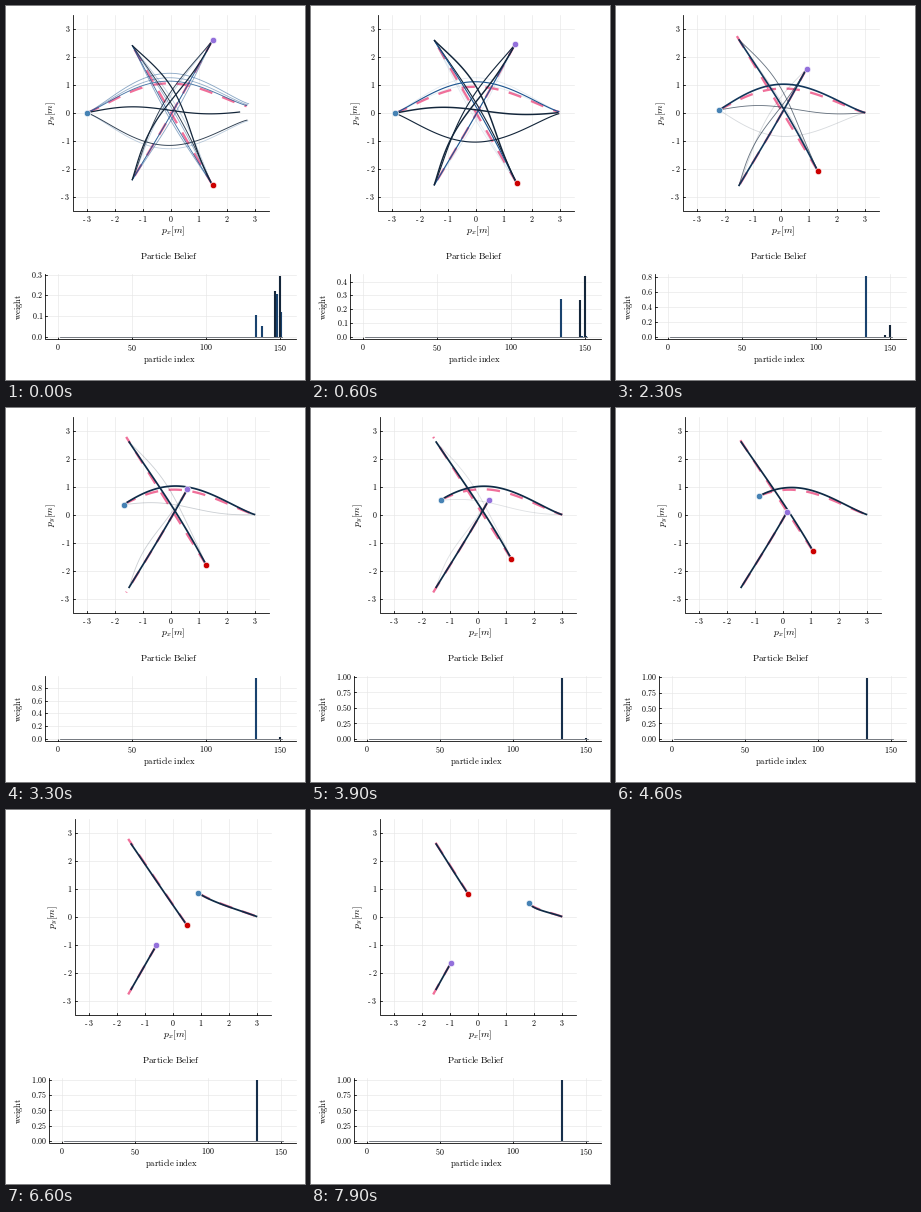
Write a matplotlib script that moves like this. It is 299x374 px and loops after 8 s.

```python
import matplotlib.pyplot as plt
import numpy as np
from matplotlib.animation import FuncAnimation
from matplotlib.colors import to_rgb

W, H, FRAMES, STEP = 299, 374, 80, 100
UNIT = 28  # pixels per metre
plt.rcParams["mathtext.fontset"] = "cm"

fig = plt.figure(figsize=((W + 1e-6) / 72, (H + 1e-6) / 72), dpi=72, facecolor="white")
ax = fig.add_axes([0, 0, 1, 1])

# Agents: blue, red, purple, with a few points (metres) passed at times T (seconds)
T = np.array([0, 1.5, 4.6, 6.6, 7.9])
TRACKS = np.array([
    [(-3, 0), (-2.54, -.02), (-.83, .66), (.91, .86), (1.83, .5)],
    [(1.5, -2.6), (1.37, -2.27), (1.09, -1.31), (.5, -.29), (-.33, .8)],
    [(1.5, 2.6), (1.15, 2), (.15, .09), (-.58, -1.02), (-.96, -1.66)],
])
GOALS = np.array([(3.02, 0), (-1.5, 2.62), (-1.5, -2.62)])
DOTS = ["#4682b4", "#cc0000", "#9370db"]
BLUE, DARK, DEEP, PINK = "#1d5590", "#14263a", "#0e2a45", "#f0709a"

# index: colour, log weight as a parabola in time, plan bend per agent, sway (pixels)
PARTICLES = {
    138: (BLUE, (-1.72, -5.4, 0), (-32, -8, -9), 0),
    151: (BLUE, (-.9, -5.4, 0), (35, 4, 4), 0),
    148: (BLUE, (-.36, -7, 0), (28, 2, 1), 0),
    147: (DARK, (-.29, -.2, -.25), (-29, -5, -11), 0),
    134: (BLUE, (-1.03, .8, .16), (31, -3, 1), 0),
    150: (DARK, (0, 0, 0), (3, -12, -7), 3.5),
}
TRUE_BEND = (26, 0, 1)
VISIBLE = .004
S = np.linspace(0, 1, 60)


def position(track, t):
    """Cubic Hermite curve through the track, starting at rest."""
    slope = np.gradient(track, T, axis=0)
    slope[0] = 0
    k = min(np.searchsorted(T, t, side="right") - 1, len(T) - 2)
    h = T[k + 1] - T[k]
    u = (t - T[k]) / h
    return ((1 + 2 * u) * (1 - u) ** 2 * track[k] + u * (1 - u) ** 2 * h * slope[k]
            + u * u * (3 - 2 * u) * track[k + 1] + u * u * (u - 1) * h * slope[k + 1])


def plan(agent, t, bend, sway=0, reach=1):
    """Path to the goal; its bend leans forward and flattens as time goes on."""
    start, goal = position(TRACKS[agent], t), GOALS[agent] * reach
    first = np.array([2.45 + .01 * abs(bend), .009 * bend]) if agent == 0 else .92 * goal
    goal = goal + np.interp(t, [0, .6, 1.5], [1, .12, 0]) * (first - goal)
    d = goal - start
    normal = np.array([-d[1], d[0]]) / np.hypot(*d)
    fade = max(-.08, 1 - (t / 6.4) ** 2)
    bump = np.sin(np.pi * S ** (1 - .06 * t)).clip(0) ** 1.2
    side = fade * (bend * bump + sway * np.sin(2 * np.pi * S)) / UNIT
    return start + S[:, None] * d + side[:, None] * normal


def weights(t):
    raw = {i: np.exp(a + b * t + c * t * t) for i, (_, (a, b, c), _, _) in PARTICLES.items()}
    total = sum(raw.values())
    return {i: v / total for i, v in raw.items()}


def mix(a, b, u):
    return tuple((1 - u) * np.array(to_rgb(a)) + u * np.array(to_rgb(b)))


def line(x, y, color="black", lw=.8, **kw):
    ax.plot(x, y, color=color, lw=lw, **kw)


def label(x, y, s, size, ha="center", rot=0, math=False):
    if not math:
        s = r"\mathrm{%s}" % s.replace(" ", r"\ ").replace("-", r"\text{-}\;")
    ax.text(x, y, f"${s}$", size=size, ha=ha, va="center", rotation=rot)


def frame_axes(box, xticks, yticks):
    """Grid, spines, inward ticks and tick labels; ticks are (pixel, text)."""
    l, t, r, b = box
    for x, s in xticks:
        line([x, x], [t, b], "#e6e6e6", .6)
        line([x, x], [b, b - 2])
        label(x, b + 8.5, s, 8)
    for y, s in yticks:
        line([l, r], [y, y], "#e6e6e6", .6)
        line([l, l + 2], [y, y])
        label(l - 2, y, s, 8, "right")
    line([l, l, r], [t, b, b])


def draw_paths(t, w, cx, cy=107):
    ticks = range(-3, 4)
    frame_axes((cx - 98, 9, cx + 98, 205),
               [(cx + UNIT * k, str(k)) for k in ticks],
               [(cy - UNIT * k, str(k)) for k in ticks])
    label(cx + 3, 225.5, "p_x[m]", 9.7, math=True)
    label(cx - 119.5, 107, "p_y[m]", 9.7, rot=90, math=True)

    def stroke(p, *args, **kw):
        line(cx + UNIT * p[:, 0], cy - UNIT * p[:, 1], *args, **kw)

    over = np.interp(t, [1.8, 2.4], [1, 1.06])
    for k, bend in enumerate(TRUE_BEND):
        stroke(plan(k, t, bend, reach=over if k else 1), PINK, 2.3,
               dashes=(5.8, 4.6), dash_capstyle="butt")
    for i, (color, _, bends, sway) in PARTICLES.items():
        if w[i] < VISIBLE:
            continue
        shade = mix(color, DEEP, np.clip(1.6 * w[i] - .6, 0, 1))
        width = np.interp(w[i], [.2, .35, 1], [.85, 1.45, 1.75])
        for k, bend in enumerate(bends):
            stroke(plan(k, t, bend, sway), shade, width,
                   alpha=min(1, 3.5 * w[i] + .1), solid_capstyle="butt")
    for track, color in zip(TRACKS, DOTS):
        x, y = position(track, t)
        line([cx + UNIT * x], [cy - UNIT * y], marker="o", ms=6.4, mfc=color,
             mec="white", mew=.6)


def draw_belief(w, step, wide, cx):
    top = max(w.values())
    x0, dx, left = (56.6, 1.456, 43) if wide else (52.4, 1.478, 39.5)
    scale = 65 / (1.06 * top)
    base = 333 - .03 * top * scale
    digits = 2 if wide else 1
    frame_axes((left, 268, 290, 333),
               [(x0 + dx * k, str(k)) for k in (0, 50, 100, 150)],
               [(base - v * scale, f"{v:.{digits}f}") for v in np.arange(0, 1.03 * top, step)])
    line([x0 + dx, x0 + 151.5 * dx], [base, base], "#5a6068", .8)
    for i, (color, *_) in PARTICLES.items():
        if w[i] >= VISIBLE:
            x = x0 + dx * i
            line([x, x], [base, base - w[i] * scale], mix(color, DARK, .8 if wide else .4),
                 2.1, solid_capstyle="butt")
    label(cx - 1.5, 249.5, "Particle Belief", 9)
    label(cx - 1.5, 354, "particle index", 8.6)
    label(12.5, 301, "weight", 8.6, rot=90)


def draw(n):
    ax.cla()
    ax.set_axis_off()
    ax.set(xlim=(.3, W + .3), ylim=(H + .3, .3))
    t = n * STEP / 1000
    w = weights(t)
    top = max(w.values())
    step = .1 if top < .583 else .2 if top < .971 else .25
    wide = step == .25
    cx = 167 if wide else 165
    draw_paths(t, w, cx)
    draw_belief(w, step, wide, cx)
    return []


anim = FuncAnimation(fig, draw, frames=FRAMES, init_func=lambda: [], interval=STEP,
                     repeat=True, repeat_delay=0)
plt.show()
```
